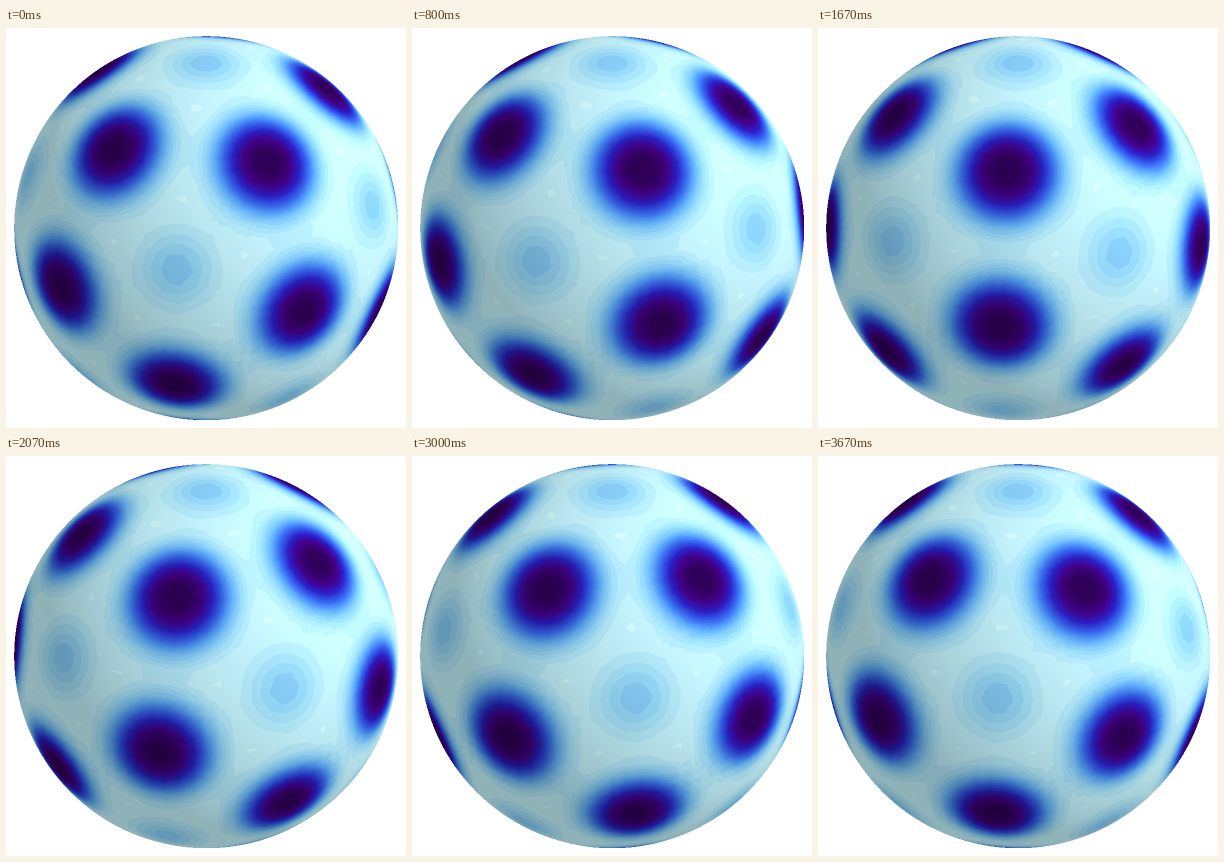
A matplotlib script that plays this animation: 400x400 px, repeating every 3.74 s.

```python
import numpy as np
import matplotlib.pyplot as plt
from matplotlib.animation import FuncAnimation
from matplotlib.colors import LinearSegmentedColormap

SIZE, SS = 400, 2            # stage size, supersampling
LOOP, FRAMES = 3740, 56
CENTRE, RADIUS = 200.2, 192.0
DIST = 6.77                  # camera distance in sphere radii
ELEV = np.radians(37.7)
START = np.radians(-8.6)
LEVELS = 26
ROWS, COLS = 48, 96          # sampling mesh, fixed in space

DEEP_SEA = LinearSegmentedColormap.from_list("deep_sea", [
    (0.00, (0.17, 0.00, 0.31)),
    (0.15, (0.25, 0.00, 0.50)),
    (0.32, (0.16, 0.12, 0.74)),
    (0.50, (0.20, 0.38, 0.89)),
    (0.67, (0.36, 0.66, 0.96)),
    (0.83, (0.60, 0.86, 0.98)),
    (1.00, (0.85, 1.00, 1.00)),
])
PALETTE = DEEP_SEA((np.arange(LEVELS) + 0.5) / LEVELS)[:, :3].astype(np.float32)


def direction(colat, lon):
    return np.stack([np.sin(colat) * np.sin(lon),
                     np.sin(colat) * np.cos(lon),
                     np.cos(colat) + 0 * lon], axis=-1)


def ring(colat_deg, offset_deg):
    lon = np.radians(offset_deg + 72 * np.arange(5))
    return direction(np.full(5, np.radians(colat_deg)), lon)


# Dark spots on dodecahedron vertices, faint ones on the face centres
DARK = np.vstack([ring(37.377, 36), ring(79.188, 36),
                  ring(100.812, 0), ring(142.623, 0)])
FAINT = np.vstack([[[0, 0, 1], [0, 0, -1]], ring(63.435, 0), ring(116.565, 36)])


def chord2(points, spots):
    return np.maximum(2 - 2 * points @ spots.T, 0)


def field(points):
    dark = np.exp(-(chord2(points, DARK) / 0.0539) ** 1.3).sum(axis=-1)
    faint = np.exp(-chord2(points, FAINT) / 0.037).sum(axis=-1)
    return 0.995 - dark - 0.22 * faint


def sphere_points():
    """Sphere points in camera space seen through each subpixel."""
    n = SIZE * SS
    axis = (np.arange(n) + 0.5) / SS
    px, py = np.meshgrid((axis - CENTRE) / RADIUS, (CENTRE - axis) / RADIUS)
    inside = px**2 + py**2 < 1
    scale = 1 / np.sqrt(DIST**2 - 1)
    u, v = px[inside] * scale, py[inside] * scale
    a = 1 + u**2 + v**2
    t = (DIST - np.sqrt(np.maximum(DIST**2 - a * (DIST**2 - 1), 0))) / a
    return inside, np.stack([u * t, v * t, DIST - t], axis=-1)


inside, cam = sphere_points()
x, y, z = cam.T
height = y * np.cos(ELEV) + z * np.sin(ELEV)
front = z * np.cos(ELEV) - y * np.sin(ELEV)
row = np.arccos(np.clip(height, -1, 1)) / np.pi * ROWS
col = (np.arctan2(x, front) / (2 * np.pi) % 1) * COLS

# Linear interpolation over two triangles per mesh cell
r0 = np.minimum(row.astype(int), ROWS - 1)
c0 = np.minimum(col.astype(int), COLS - 1)
a, b = (row - r0).astype(np.float32), (col - c0).astype(np.float32)
corner = r0 * (COLS + 1) + c0
WEIGHTS = [
    (corner, np.maximum(0, 1 - a - b)),
    (corner + COLS + 1, np.minimum(a, 1 - b)),
    (corner + 1, np.minimum(b, 1 - a)),
    (corner + COLS + 2, np.maximum(0, a + b - 1)),
]

lamp = np.array([0.65, 0.45, 0.61])
shade = (0.73 + 0.36 * np.maximum(cam @ lamp, 0)).astype(np.float32)[:, None]

mesh_colat, mesh_lon = np.meshgrid(np.linspace(0, np.pi, ROWS + 1),
                                   np.linspace(0, 2 * np.pi, COLS + 1),
                                   indexing="ij")
canvas = np.ones((SIZE * SS, SIZE * SS, 3), np.float32)


def render(i):
    turn = START - np.radians(72) * i / FRAMES
    nodes = field(direction(mesh_colat, mesh_lon - turn)).astype(np.float32).ravel()
    value = sum(nodes[k] * w for k, w in WEIGHTS)
    band = np.clip((value * LEVELS).astype(int), 0, LEVELS - 1)
    canvas[inside] = np.minimum(PALETTE[band] * shade, 1)
    return canvas.reshape(SIZE, SS, SIZE, SS, 3).mean(axis=(1, 3))


fig = plt.figure(figsize=(4, 4), dpi=100, facecolor="white")
ax = fig.add_axes([0, 0, 1, 1])
ax.axis("off")
image = ax.imshow(render(0), interpolation="nearest", aspect="auto")


def update(i):
    image.set_data(render(i))
    return [image]


anim = FuncAnimation(fig, update, frames=FRAMES, interval=LOOP / FRAMES,
                     repeat=True, repeat_delay=0, blit=False)
plt.show()
```
